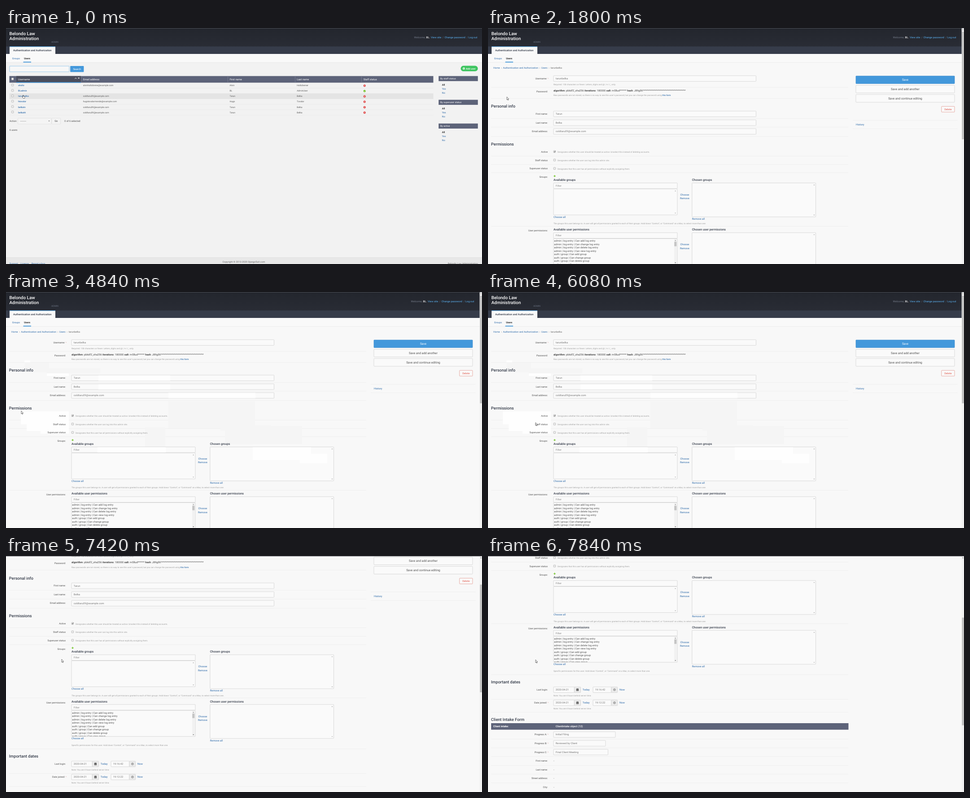
Write an HTML page that moves like this. It is 1061 px wide and 528 px high and loops after 8 s.

```html
<!DOCTYPE html>
<html lang="en">
<head>
<meta charset="utf-8">
<title>Administration</title>
<style>
html, body { margin: 0; width: 100%; height: 100%; overflow: hidden; background: #f8f8f8; }
svg { display: block; }
#stage { width: 100vw; height: 100vh; }
text { font-family: Roboto, "Liberation Sans", sans-serif; text-rendering: geometricPrecision; white-space: pre; }
</style>
</head>
<body>
<svg id="stage" viewBox="0 0 1061 528" preserveAspectRatio="none"></svg>
<script>
const stage = document.getElementById('stage');
const LINK = '#2a68a8', TEXT = '#4a4a4a', DARK = '#333a48', HELP = '#999', SLATE = '#5d6379', BLUE = '#4398db';
const S11 = 4.64, S12 = 4.97, S13 = 5.39, S14 = 5.8, S16 = 6.63;
const SITE = 'Belondo Law';

function el(parent, tag, attrs) {
  const node = document.createElementNS('http://www.w3.org/2000/svg', tag);
  for (const k in attrs) node.setAttribute(k, attrs[k]);
  parent.appendChild(node);
  return node;
}
const group = parent => el(parent, 'g', {});
const rect = (g, x, y, width, height, fill, extra) => el(g, 'rect', { x, y, width, height, fill, ...extra });
const path = (g, d, stroke, w = 0.8, fill = 'none') => el(g, 'path', { d, stroke, fill, 'stroke-width': w });
const frame = (g, x, y, w, h, fill = '#fafafa', stroke = '#ccc', rx = 0.8) =>
  rect(g, x, y, w, h, fill, { stroke, 'stroke-width': 0.7, rx });
const rule = (g, x, y, w, c = '#ebebeb') => rect(g, x, y, w, 0.7, c);

// cy is the middle of the capitals; str may be a list of [text, weight, colour]
function text(g, x, cy, str, size = S14, fill = TEXT, weight = 400, anchor = 'start') {
  const t = el(g, 'text', { x, y: cy + size * 0.36, 'font-size': size, fill, 'font-weight': weight, 'text-anchor': anchor });
  if (typeof str === 'string') t.textContent = str;
  else for (const [s, w, c] of str) el(t, 'tspan', { 'font-weight': w || weight, fill: c || fill }).textContent = s;
  return t;
}

function checkbox(g, x, y, on) {
  frame(g, x, y, 4.6, 4.6, '#eee', '#aaa');
  if (on) path(g, `M${x + 1} ${y + 2.4}l1.1 1.2 1.7-2.7`, '#333', 0.9);
}
function arrow(g, x, y, dir, c = '#999') {
  path(g, `M${x - 1.4} ${y + dir * 0.8}h2.8l-1.4 ${-dir * 1.7}z`, 'none', 0, c);
}

const defs = el(stage, 'defs', {});
const grad = el(defs, 'linearGradient', { id: 'head', x2: 0, y2: 1 });
el(grad, 'stop', { offset: 0, 'stop-color': '#23262d' });
el(grad, 'stop', { offset: 1, 'stop-color': '#292c35' });

function header(g, dx, bg) {
  rect(g, 0, 0, 1061, 42, 'url(#head)');
  rect(g, 0, 41.3, 1061, 16.9, '#363c4a');
  rect(g, 0, 58, 1061, 19, '#f9f9f9');
  rule(g, 0, 76.8, 1061, '#e6e6e6');
  rect(g, 8, 41.6, 102, 17, '#f9f9f9');
  rect(g, 8, 41.2, 102, 1.1, BLUE);
  text(g, 7.5, 12.3, SITE, 9.95, '#fff', 500);
  text(g, 7.5, 23.2, 'Administration', 9.95, '#fff', 500);
  text(g, 101, 31.5, 'ADMIN', S12, '#6c7484');
  text(g, 16, 49.7, 'Authentication and Authorization', S14, DARK, 500);
  text(g, 13.8, 68, 'Groups', S13, LINK);
  text(g, 40.2, 68, 'Users', S13, '#222', 700);
  rect(g, 38.5, 75.4, 17.5, 1.8, BLUE);
  const link = '#5cb2f2', dim = '#737a88';
  [[909.5, 'Welcome,', dim], [936.5, 'BL.', '#eee', 500], [947, 'View site', link], [973, '/', dim],
   [977.5, 'Change password', link], [1027, '/', dim], [1031, 'Log out', link]]
    .forEach(([x, s, c, w]) => text(g, x + dx, 20.8, s, S14, c, w));
}

/* ---------- user list ---------- */
const list = group(stage);
rect(list, 0, 0, 1061, 528, '#f2f2f2');
header(list, 0);
const search = frame(list, 8, 85.2, 133, 12.8, '#f7f7f7', '#77b9e8');
rect(list, 143.2, 85, 30.2, 13.4, BLUE, { rx: 1 });
text(list, 158.3, 91.7, 'Search', S14, '#fff', 400, 'middle');
rect(list, 1013.5, 84.6, 38.3, 12.2, '#3fc561', { rx: 6.1 });
el(list, 'circle', { cx: 1020.5, cy: 90.7, r: 2.4, fill: '#fff' });
path(list, 'M1019.2 90.7h2.6M1020.5 89.4v2.6', '#3fc561', 0.7);
text(list, 1025, 90.7, 'Add user', S13, '#fff', 500);

rect(list, 7.5, 107.5, 945, 14.8, SLATE);
rect(list, 23, 107.5, 144, 14.8, '#4a4d5c');
rect(list, 23, 121, 144, 1.5, BLUE);
[167, 494, 644, 792].forEach(x => rect(list, x, 107.5, 0.7, 14.8, '#80859a'));
checkbox(list, 12.3, 111.6);
const heads = [[27, 'Username'], [171.7, 'Email address'], [498.5, 'First name'], [648.3, 'Last name'], [796.7, 'Staff status']];
heads.forEach(([x, s]) => text(list, x, 115, s, S14, '#fff'));
path(list, 'M153.4 113.6l2-2 2 2', '#fff', 1);
path(list, 'M160.7 110.6l3 3m0-3l-3 3', '#fff', 1);

const users = [
  ['aholtz', 'alvinholtzbrene@example.com', 'Alvin', 'Holtzbrener'],
  ['BLadmin', '', 'BL', 'AdminUser'],
  ['tarunbelka', 'coldtaru09@example.com', 'Tarun', 'Belka'],
  ['htovalar', 'hugotovalarmende@example.com', 'Hugo', 'Tovalar'],
  ['belkatn', 'coldtaru09@example.com', 'Tarun', 'Belka'],
  ['belkattt', 'coldtaru09@example.com', 'Tarun', 'Belka']
];
users.forEach((user, i) => {
  const cy = 128.5 + i * 12.06;
  if (i === 2) rect(list, 7.5, cy - 6, 945, 12, '#e4e4e4');
  rule(list, 7.5, cy + 5.8, 945, '#e6e6e6');
  checkbox(list, 12.3, cy - 3.2);
  user.forEach((s, j) => text(list, heads[j][0], cy, s, S12, j ? '#555' : LINK, j ? 400 : 500));
  el(list, 'circle', { cx: 799.2, cy: cy + 0.4, r: 2.5, fill: i === 1 ? '#6cbc1f' : '#dc3535' });
  path(list, i === 1 ? `M797.9 ${cy + 0.5}l1 1 1.7-1.9` : `M798.2 ${cy - 0.6}l2 2m0-2l-2 2`, '#fff', 0.8);
});

text(list, 7.8, 208.4, 'Action:', S13);
frame(list, 26.5, 201.7, 74.5, 13.3, '#f4f4f4', '#ddd');
text(list, 31.5, 208.2, '---------', S13);
arrow(list, 96, 208.2, -1, '#333');
frame(list, 102, 201.7, 19.6, 13.3, '#f4f4f4', '#ddd');
text(list, 111.8, 208.4, 'Go', S14, TEXT, 400, 'middle');
text(list, 130.3, 208.4, '0 of 6 selected', S13);
text(list, 7.8, 227.6, '6 users', S13);

['By staff status', 'By superuser status', 'By active'].forEach((s, i) => {
  const y = 107.5 + i * 53.1;
  rect(list, 964.3, y, 87.5, 11.3, SLATE);
  text(list, 968, y + 5.8, s, S13, '#fff');
  text(list, 971.8, y + 19.5, 'All', S13, '#333', 700);
  text(list, 971.8, y + 28.6, 'Yes', S13, LINK);
  text(list, 971.8, y + 37.7, 'No', S13, LINK);
});

rect(list, 0, 513.5, 1061, 15, '#e8e8e8');
rule(list, 0, 513.2, 1061, '#dedede');
[[7.8, 'Support'], [32.2, 'Licence'], [56.8, 'Report a bug']].forEach(([x, s]) => text(list, x, 527, s, S13, LINK));
text(list, 530, 522.7, 'Copyright © 2013-2020 DjangoSuit.com', S13, '#666', 400, 'middle');
text(list, 1052, 527, SITE + ' Administration', S13, '#666', 400, 'end');

/* ---------- user form ---------- */
const form = group(stage);
rect(form, 0, 0, 1061, 528, '#f8f8f8');
const page = group(form);
const boxes = group(page), marks = group(page), words = group(page);
header(boxes, -7);

const heading = (cy, s) => text(words, 6.8, cy, s, 9.1, DARK, 500);
const help = (x, cy, s) => text(words, x, cy, s, S11, HELP);
function label(cy, s, star) {
  text(words, star ? 131.3 : 133, cy, s, S13, TEXT, 400, 'end');
  if (star) text(words, 132.8, cy + 0.3, '*', S12, '#d9a0a0');
}
function input(cy, w, s, x = 146) {
  frame(boxes, x, cy - 6.3, w, 12.7);
  text(words, x + 4.8, cy, s, S14, '#777');
}
const link = (x, cy, s, anchor) => text(words, x, cy, s, S14, LINK, 400, anchor);

text(words, 12, 89, [['Home', 400, LINK], ['  ›  '], ['Authentication and Authorization', 400, LINK],
  ['  ›  '], ['Users', 400, LINK], ['  ›  '], ['tarunbelka']], S13, '#666');

label(112.8, 'Username:', true);
input(113, 451.5, 'tarunbelka');
help(146, 126.5, 'Required. 150 characters or fewer. Letters, digits and @/./+/-/_ only.');
label(142, 'Password:');
text(words, 146, 139.8, [['algorithm', 700], [': pbkdf2_sha256 '], ['iterations', 700], [': 180000 '], ['salt', 700],
  [': m5llud****** '], ['hash', 700], [': J89gEK' + '*'.repeat(38)]], S14, '#444');
text(words, 146, 150.6, [["Raw passwords are not stored, so there is no way to see this user's password, but you can change the password using "],
  ['this form', 500, LINK], ['.']], S11, HELP);

heading(175, 'Personal info');
[['First name:', 'Tarun'], ['Last name:', 'Belka'], ['Email address:', 'coldtaru09@example.com']].forEach(([l, v], i) => {
  label(192 + i * 19.6, l);
  input(192.2 + i * 19.6, 451.5, v);
});

heading(259.7, 'Permissions');
[['Active', 'Designates whether this user should be treated as active. Unselect this instead of deleting accounts.'],
 ['Staff status', 'Designates whether the user can log into this admin site.'],
 ['Superuser status', 'Designates that this user has all permissions without explicitly assigning them.']].forEach(([l, h], i) => {
  const cy = 276.9 + i * 18.8;
  label(cy, l);
  checkbox(boxes, 146.1, cy - 2.6, i === 0);
  help(155, cy + 0.7, h);
});
[132.5, 157, 202, 221.5, 242.3, 286, 305, 323.5, 443, 557, 612, 641].forEach(y => rule(boxes, 7, y, 796));

function selector(y, name, note) {
  text(words, 146, y, 'Available ' + name, S16, DARK, 500);
  text(words, 454.8, y, 'Chosen ' + name, S16, DARK, 500);
  frame(boxes, 146, y + 7, 276, 12.6);
  text(words, 150.8, y + 13.4, 'Filter', S14, '#888');
  frame(boxes, 146, y + 20.4, 276, 58.2);
  frame(boxes, 454.8, y + 7, 275.7, 76);
  arrow(boxes, 417.6, y + 24.8, 1);
  arrow(boxes, 417.6, y + 74.6, -1);
  arrow(boxes, 727, y + 11.4, 1);
  arrow(boxes, 727, y + 79, -1);
  link(438.4, y + 33.4, 'Choose', 'middle');
  link(438.4, y + 41.8, 'Remove', 'middle');
  link(146, y + 83.2, 'Choose all');
  link(454.8, y + 87.4, 'Remove all');
  help(146, y + 98.2, note);
}
const HOLD = 'Hold down "Control", or "Command" on a Mac, to select more than one.';
label(333.4, 'Groups:');
path(boxes, 'M146.2 331.3h4.6M148.5 329v4.6', '#6cc21f', 1.2);
selector(339.6, 'groups', 'The groups this user belongs to. A user will get all permissions granted to each of their groups. ' + HOLD);
label(453.3, 'User permissions:');
selector(450.9, 'user permissions', 'Specific permissions for this user. ' + HOLD);

const options = el(words, 'svg', { x: 146.4, y: 471.7, width: 268, height: 57.4, overflow: 'hidden' });
['admin | log entry', 'auth | group'].forEach((kind, k) =>
  ['add', 'change', 'delete', 'view'].forEach((verb, i) =>
    text(options, 0.9, 4.6 + (k * 4 + i) * 7.47, `${kind} | Can ${verb} ${kind.split('| ')[1]}`, S14, '#555')));
rect(boxes, 415, 472, 5.6, 57, '#f1f1f1');
rect(boxes, 415.3, 478.3, 5, 10, '#c4c4c4');
arrow(boxes, 417.7, 475.4, 1, '#777');
arrow(boxes, 417.7, 525.4, -1, '#444');

heading(573.8, 'Important dates');
[['Last login:', '19:16:42'], ['Date joined:', '19:12:22']].forEach(([l, time], i) => {
  const cy = 590.9 + i * 29.2;
  label(cy, l, i === 1);
  frame(boxes, 192, cy - 6.3, 14.5, 12.7, '#ebebeb');
  frame(boxes, 274.5, cy - 6.3, 14, 12.7, '#ebebeb');
  input(cy, 46.3, '2020-04-21');
  input(cy, 40.7, time, 234);
  rect(boxes, 196.8, cy - 2.2, 5.2, 5, '#555', { rx: 0.5 });
  path(boxes, `M198.3 ${cy - 3.2}v1.6M200.5 ${cy - 3.2}v1.6`, '#555', 0.8);
  path(boxes, `M197.4 ${cy + 0.7}h4M198.6 ${cy - 0.6}v3M200.2 ${cy - 0.6}v3`, '#ddd', 0.35);
  el(boxes, 'circle', { cx: 281.9, cy, r: 2.2, fill: 'none', stroke: '#555', 'stroke-width': 0.8 });
  path(boxes, `M282 ${cy - 1.2}v1.4h-1`, '#555', 0.6);
  link(210.8, cy, 'Today');
  link(293, cy, 'Now');
  help(146, cy + 13, 'Note: You are 4 hours behind server time.');
});

heading(657.8, 'Client Intake Form');
rect(boxes, 7, 665.7, 796.5, 14.6, SLATE);
text(words, 11.8, 672.8, 'Client intake:', S14, '#fff', 700);
text(words, 150.7, 672.8, 'ClientIntake object (12)', S14, '#fff', 500);
[['Progress A:', 'Initial Filing', 138], ['Progress B:', 'Reviewed by Client', 116], ['Progress C:', 'Final Client Meeting', 121.5],
 ['First name:'], ['Last name:'], ['Street address:'], ['City:']].forEach(([l, v, w], i) => {
  const cy = 691.1 + i * 19.6;
  label(cy, l, !!v);
  if (v) input(cy, w, v);
  else text(words, 146, cy, '-', S14);
  rule(boxes, 7, cy + 9.8, 796);
});

function button(y, s, fill, stroke, c) {
  frame(boxes, 820, y, 220, 17.2, fill, stroke, 1);
  text(words, 930, y + 8.7, s, S16, c, 400, 'middle');
}
button(107.3, 'Save', BLUE, '#3a8bcd', '#fff');
button(128.1, 'Save and add another', '#fafafa', '#ccc', TEXT);
button(148.9, 'Save and continue editing', '#fafafa', '#ccc', TEXT);
frame(boxes, 1010.8, 175.3, 29.2, 12.8, '#fafafa', '#e08a80', 1);
text(words, 1025.4, 181.7, 'Delete', S14, '#e0564a', 400, 'middle');
rule(boxes, 813, 206, 234);
rule(boxes, 813, 225, 234);
link(820, 215.8, 'History');

rect(form, 1055.7, 0, 5.3, 528, '#f1f1f1');
arrow(form, 1058.6, 4, 1, '#555');
const thumb = rect(form, 1056.4, 8, 4.6, 241, '#c1c1c1');
rect(stage, 0, 0, 1061, 0.8, '#54575e');

// light areas left behind the pointer: start, x, y, w, h, fill
const W = '#fefefe', F = '#f5f5f5';
const trails = [
  [2080, 42, 158, 54, 22, F], [2080, 41, 153, 13, 4.5, W], [2220, 91, 171, 119, 11, F], [2220, 91, 182, 49, 6, W],
  [2360, 206, 186.5, 160, 12, W], [2360, 206, 206, 160, 12, W], [2500, 362, 225.5, 194, 12, W], [2500, 362, 244, 193, 54, F],
  [2790, 655, 362, 61, 21, W], [3070, 550, 347, 130, 29, W], [3320, 488, 300, 172, 40, F],
  [3450, 478, 298, 112, 12, F], [3580, 362, 290, 120, 15, F],
  [4120, 310, 303, 45, 43, F], [4240, 204, 347, 152, 12, W], [4500, 77, 305, 63, 12, W],
  [4630, 46, 293, 94, 18, W], [4750, 33, 267, 107, 29, W]
].map(([t, ...r]) => ({ t, node: rect(marks, ...r) }));

/* ---------- pointer ---------- */
const pointer = group(stage);
const shapes = {
  arrow: path(pointer, 'M0 0V6.7L1.5 5.3 2.5 7.6 3.5 7.2 2.5 4.9H4.6Z', '#222', 0.6, '#fff'),
  hand: path(pointer, 'M0 .6Q.6-.4 1.2.6V2.8L4 3.4Q4.7 3.6 4.6 4.4L4 7.4H1L-1 4.6Q-1 3.8 0 4.4Z', '#222', 0.6, '#fff'),
  beam: path(pointer, 'M-1.3-3.6h2.6M0-3.6v7.2M-1.3 3.6h2.6', '#333', 0.7)
};
const moves = [
  [0, 37.5, 150], [120, 32, 128], [270, 18, 99], [390, 14.2, 92], [670, 20, 104], [820, 32, 132], [970, 40, 153.6],
  [1250, 40.6, 153.8], [1400, 41, 154], [1680, 42, 154],
  [2080, 91, 173], [2220, 206, 181], [2360, 361, 211], [2500, 551, 298], [2640, 656, 364], [2790, 711, 374], [2930, 700, 371], [3070, 675, 361],
  [3190, 655, 332], [3320, 585, 302], [3450, 480, 299], [3580, 363, 294], [3700, 247, 286], [3850, 206, 276], [3980, 310, 318], [4120, 351, 350],
  [4240, 204, 350], [4370, 136, 309], [4500, 78, 306], [4630, 47, 294], [4750, 34, 266], [4880, 56, 272], [5000, 92, 280], [5130, 128, 288], [5260, 143, 295],
  [5380, 118, 306], [5510, 77, 300], [5650, 87, 293], [5960, 97, 293], [6080, 106, 292],
  [6640, 110, 280], [6770, 118, 256], [6910, 124, 236], [7030, 127, 230], [7420, 124, 231], [7570, 121, 231], [7690, 113, 232], [7840, 106, 232]
];
const scrolls = [[0, 0], [7030, 5], [7150, 42], [7300, 88], [7420, 125.7], [7570, 166], [7690, 228], [7840, 291.7]];
const at = (keys, t) => keys.filter(k => k[0] <= t).pop();
const show = (node, on) => node.setAttribute('visibility', on ? 'visible' : 'hidden');

function draw(t) {
  const onForm = t >= 1680;
  list.style.display = onForm ? 'none' : '';
  form.style.display = onForm ? '' : 'none';
  search.setAttribute('stroke', t < 670 ? '#77b9e8' : '#ccc');

  const y = at(scrolls, t)[1];
  page.setAttribute('transform', `translate(0 ${-y})`);
  thumb.setAttribute('y', 8 + y * 0.445);
  trails.forEach(m => show(m.node, t >= m.t && t < 7030));

  const [, px, py] = at(moves, t);
  const kind = t >= 270 && t < 670 ? 'beam' : t < 120 || (t >= 970 && !onForm) ? 'hand' : 'arrow';
  pointer.setAttribute('transform', `translate(${px} ${py})`);
  for (const k in shapes) show(shapes[k], k === kind);
}

function tick() {
  draw(performance.now() % 8000);
  requestAnimationFrame(tick);
}
tick();
</script>
</body>
</html>
```
